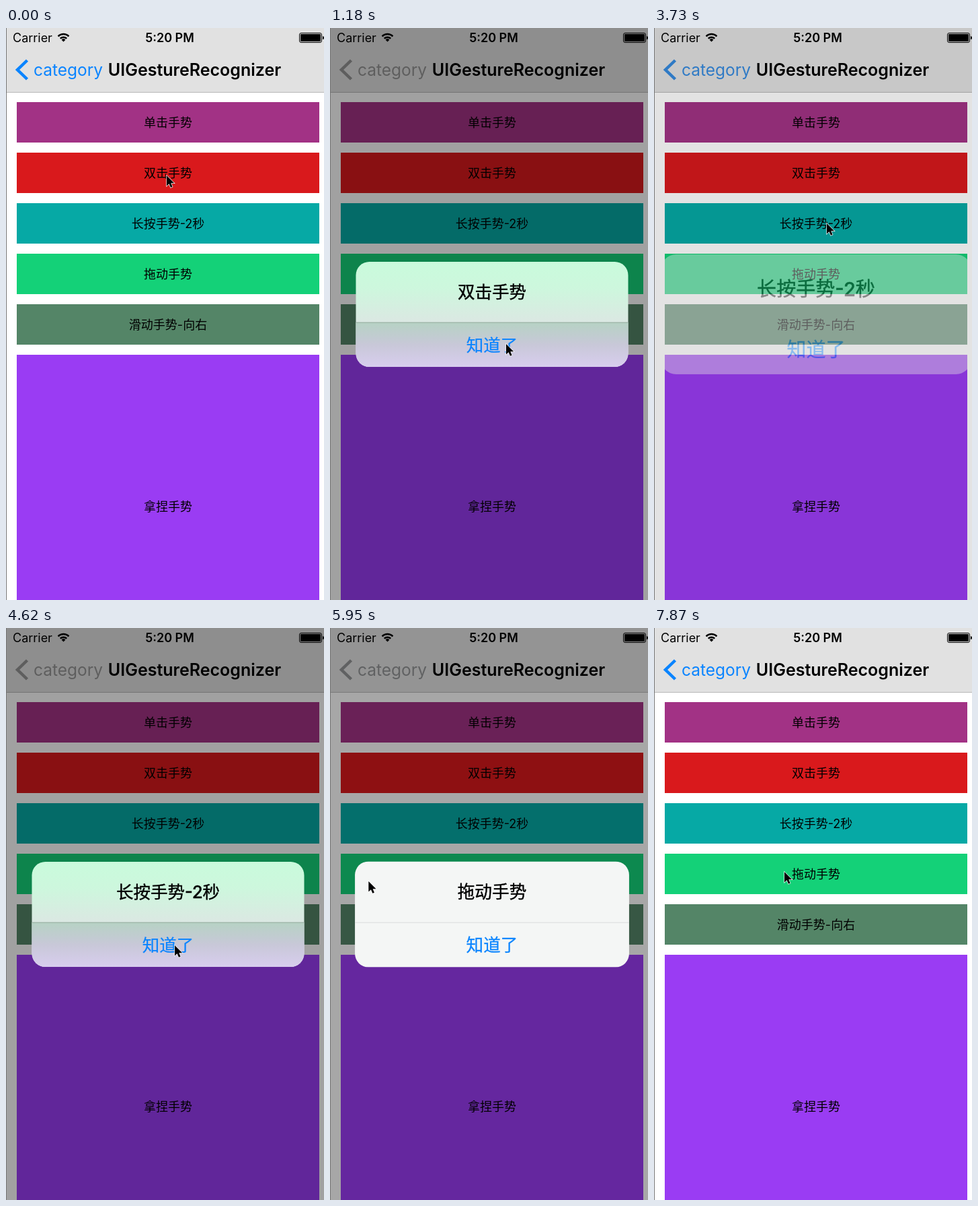
An HTML page that plays this animation: 473 px wide and 849 px high, repeating every 8000 ms.

```html
<!DOCTYPE html>
<html lang="zh-CN">
<head>
<meta charset="utf-8">
<style>
  html, body { margin: 0; width: 100%; height: 100%; overflow: hidden; background: #fff; }
  svg { display: block; width: 473px; height: 849px; }
  text { font-family: Inter, "Noto Sans CJK SC", "Noto Sans CJK", sans-serif; }
  .mid { text-anchor: middle; }
  .row { font-size: 18px; }
  .alert { font-size: 25.5px; }
  .title { font-weight: 500; stroke: #000; stroke-width: .4; }
</style>
</head>
<body>
<svg viewBox="0 0 473 849">
  <defs>
    <linearGradient id="glass" x1="0" y1="0" x2="0" y2="1">
      <stop offset="0" stop-color="#c9fbdc"/>
      <stop offset=".25" stop-color="#cdf7dd"/>
      <stop offset=".55" stop-color="#dae9e2"/>
      <stop offset=".8" stop-color="#e8e4f3"/>
      <stop offset="1" stop-color="#e9e4f5"/>
    </linearGradient>
    <linearGradient id="held" x1="0" y1="0" x2="0" y2="1">
      <stop offset="0" stop-color="#b6d2c4"/>
      <stop offset=".5" stop-color="#c8c8d8"/>
      <stop offset="1" stop-color="#d8cdee"/>
    </linearGradient>
    <clipPath id="card"><rect x="38.5" y="347" width="405" height="156" rx="20"/></clipPath>
  </defs>

  <rect width="473" height="849" fill="#fff"/>
  <rect width="473" height="95" fill="#e1e1e1"/>
  <rect y="95" width="473" height="1" fill="#b8b8b8"/>
  <g id="rows"></g>
  <g id="back">
    <path d="M31.5 48 17 62 31.5 76" fill="none" stroke="currentColor" stroke-width="4.5"/>
    <text x="41" y="71" font-size="24.5" fill="currentColor">category</text>
  </g>
  <rect id="dim" x="1" width="472" height="849"/>

  <text x="10" y="21" font-size="18">Carrier</text>
  <g fill="none" stroke="#000" stroke-width="2.4">
    <path d="M77.5 12.3a11.5 11.5 0 0 1 16 0M80.7 15.7a7 7 0 0 1 9.6 0"/>
    <path d="M85.5 20.5 82.6 17.4a4.2 4.2 0 0 1 5.8 0z" fill="#000" stroke="none"/>
  </g>
  <text class="mid" x="243.5" y="21" font-size="18" font-weight="600">5:20 PM</text>
  <rect x="436.5" y="7.5" width="33" height="14" rx="2.5" fill="none" stroke="#000"/>
  <rect x="438" y="9" width="30" height="11" rx="1"/>
  <path d="M471 12q2 0 2 2.5t-2 2.5z"/>
  <text class="mid" x="280.5" y="71" font-size="25" font-weight="600">UIGestureRecognizer</text>
  <rect width="1" height="849" fill="#777"/>

  <g id="alert">
    <g clip-path="url(#card)">
      <rect id="panel" x="38" y="347" width="406" height="156"/>
      <rect id="press" x="38" y="437" width="406" height="66" fill="url(#held)"/>
      <rect id="divider" x="38" y="436.6" width="406" height="1"/>
    </g>
    <text id="title" class="mid alert title" x="241" y="401"></text>
    <text class="mid alert" x="241" y="480" fill="#0a84ff" stroke="#0a84ff" stroke-width=".25">知道了</text>
  </g>

  <path id="cursor" d="M0 0V15.6L3.6 12.3 6 17.8 8.6 16.7 6.3 11.3H11.2Z" stroke="#fff" stroke-width="1.3" paint-order="stroke"/>
</svg>
<script>
const LOOP = 8000;
const $ = id => document.getElementById(id);

const rows = [
  ['单击手势', '#a23285'], ['双击手势', '#d9191c'], ['长按手势-2秒', '#06a9a5'],
  ['拖动手势', '#14d178'], ['滑动手势-向右', '#548567'], ['拿捏手势', '#9a3cf3']
];
$('rows').innerHTML = rows.map(([label, color], i) => {
  const y = 110 + 75 * i, h = i < 5 ? 60 : 450;
  return `<rect x="16" y="${y}" width="450" height="${h}" fill="${color}"/>
    <text class="mid row" x="241" y="${y + h / 2 + 6.7}">${label}</text>`;
}).join('');

// Screen updates come in bursts of even ticks; cursor keys are [tick, x, y].
const bursts = [
  { start: 290, step: 148.8, last: 9,
    cursor: [[0, 239, 219], [1, 241, 240], [2, 261, 437], [3, 262, 464], [4, 262, 470],
             [6, 262, 468], [7, 261, 429], [8, 258, 330], [9, 257, 290]],
    alerts: [{ row: 1, open: 0, press: 4, close: 6, dim: .37 }] },
  { start: 3730, step: 147.8, last: 28,
    cursor: [[0, 257, 290], [2, 257, 300], [4, 253, 455], [5, 251, 471], [7, 251, 471],
             [8, 248, 450], [10, 215, 372], [12, 180, 369], [14, 58, 376], [17, 56, 376],
             [20, 180, 462], [21, 212, 472], [24, 212, 471], [26, 200, 395], [27, 195, 365], [28, 194, 362]],
    alerts: [{ row: 2, open: 0, press: 5, close: 7, dim: .37 },
             { row: 3, open: 14, press: 22, close: 24, dim: .35 }] }
];

function cursorAt(keys, tick) {
  const i = keys.findIndex(k => k[0] >= tick);
  if (i <= 0) return keys[0].slice(1);
  const [a, ax, ay] = keys[i - 1], [b, bx, by] = keys[i];
  const p = (tick - a) / (b - a);
  return [ax + (bx - ax) * p, ay + (by - ay) * p];
}

function alertLook(alert, tick) {
  if (!alert) return { opacity: 0, scale: 1, dim: 0 };
  if (tick === alert.open) return { opacity: .41, scale: 1.14, dim: .11, fill: '#e4e4e4' };
  if (tick === alert.open + 1) return { opacity: 1, scale: 1.007, dim: .345, fill: '#f4f6f5' };
  if (tick === alert.close) return { opacity: .45, scale: 1, dim: .16, fill: '#e4e4e4' };
  return { opacity: 1, scale: 1, dim: alert.dim, held: tick >= alert.press };
}

function backColor(p) {
  const mix = (a, b) => Math.round(a + (b - a) * p);
  return `rgb(${mix(10, 148)},${mix(132, 148)},${mix(255, 148)})`;
}

function draw(time) {
  const burst = bursts[time < bursts[1].start ? 0 : 1];
  const tick = Math.min(burst.last, Math.floor((time - burst.start) / burst.step));
  const alert = burst.alerts.find(a => tick >= a.open && tick <= a.close);
  const look = alertLook(alert, tick);
  const [x, y] = cursorAt(burst.cursor, tick);

  $('cursor').setAttribute('transform', `translate(${x} ${y})`);
  $('dim').setAttribute('opacity', look.dim);
  $('back').style.color = backColor(Math.min(1, look.dim / .35));
  $('alert').setAttribute('opacity', look.opacity);
  $('alert').setAttribute('transform',
    `translate(241 425) scale(${look.scale}) translate(-241 -425)`);
  $('panel').setAttribute('fill', look.fill || 'url(#glass)');
  $('press').setAttribute('opacity', look.held ? 1 : 0);
  $('divider').setAttribute('fill', look.fill ? '#d9dbdb' : '#91a79b');
  $('divider').setAttribute('opacity', look.opacity < 1 ? 0 : 1);
  $('title').textContent = alert ? rows[alert.row][0] : '';
}

const begin = performance.now();
function loop() {
  draw((performance.now() - begin) % LOOP);
  requestAnimationFrame(loop);
}
loop();
</script>
</body>
</html>
```
